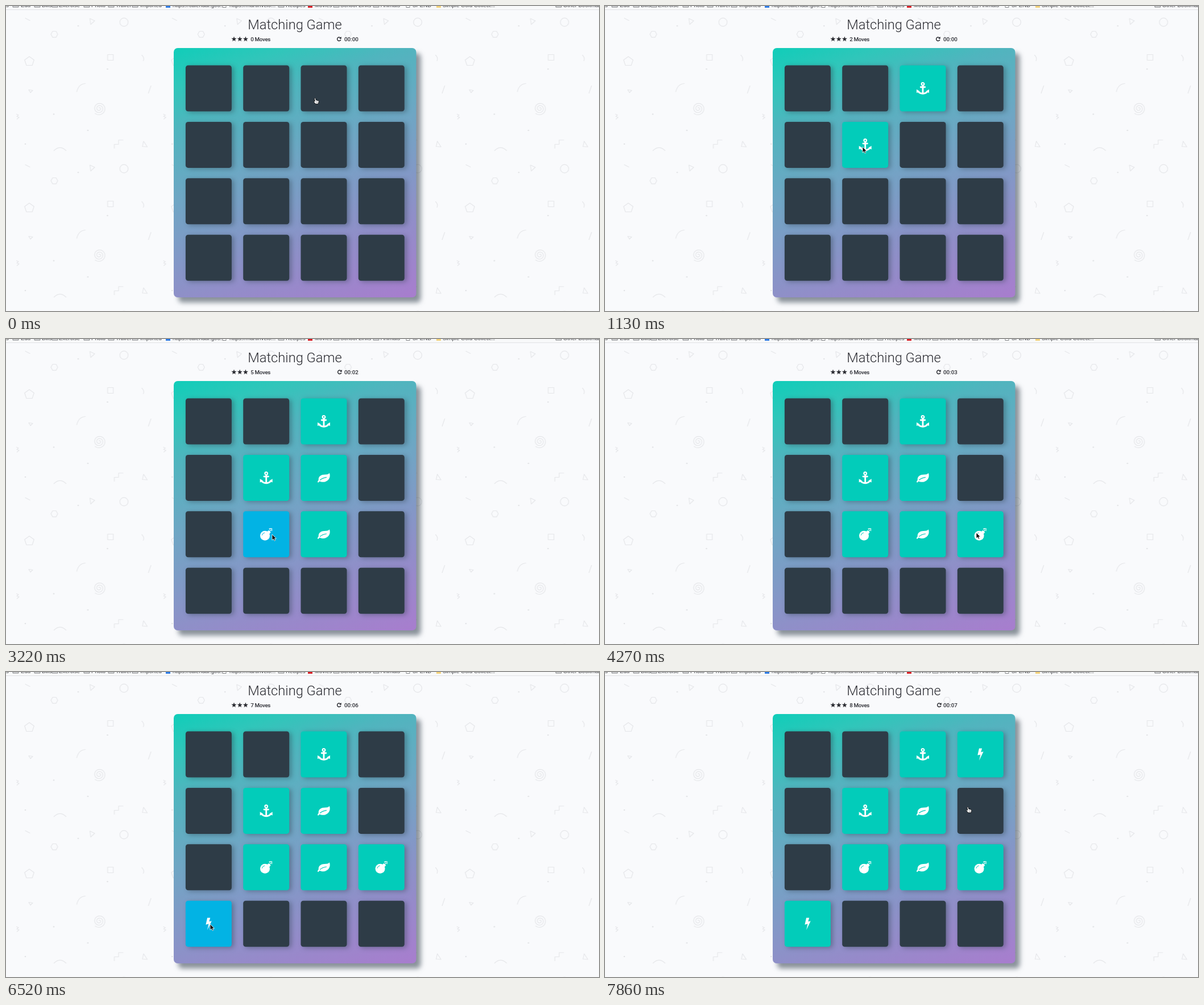
An HTML page for the animation above (8000 ms loop, 1043x537 px).

```html
<!DOCTYPE html>
<html lang="en">
<head>
<meta charset="utf-8">
<title>Matching Game</title>
<style>
  html, body { margin: 0; width: 100%; height: 100%; overflow: hidden; background: #f9fafc; }
  svg { display: block; width: 100%; height: 100%; }
  .title { font: 300 23.7px Roboto, "Liberation Sans", sans-serif; fill: #2b2c32; }
  .stat { font: 500 9.8px Roboto, sans-serif; fill: #2b2c32; }
  .bar { font: 9.6px "Liberation Sans", Arial, sans-serif; fill: #3d3e42; }
  .board { filter: drop-shadow(8px 9px 4px rgba(46, 61, 73, .55)); }
  .card { filter: drop-shadow(4px 2px 4px rgba(46, 61, 73, .42)); }
  .line { fill: none; stroke-linecap: round; stroke-linejoin: round; }
  .cut { fill: none; stroke: currentColor; stroke-linecap: round; }
</style>
</head>
<body>
<svg id="stage" viewBox="0 0 1043 537" xmlns="http://www.w3.org/2000/svg">
  <defs>
    <linearGradient id="sea" gradientUnits="userSpaceOnUse" x1="412.6" y1="31.3" x2="603.4" y2="555.7">
      <stop offset="0" stop-color="#10cdb9"/>
      <stop offset=".12" stop-color="#30c6ba"/>
      <stop offset=".24" stop-color="#4fb5be"/>
      <stop offset=".455" stop-color="#6fa6c4"/>
      <stop offset=".735" stop-color="#8e90c8"/>
      <stop offset="1" stop-color="#a87dce"/>
    </linearGradient>
    <pattern id="doodles" width="258.3" height="258" patternUnits="userSpaceOnUse">
      <g class="line" stroke="#e5e6e9" stroke-width="1.2">
        <path d="M41 89l8.3 6-3.2 9.5h-10.2l-3.2-9.5z"/>
        <path d="M82 44.500h6l3 5.300-3 5.300h-6l-3-5.300z"/>
        <circle cx="207.500" cy="28.500" r="7.300"/>
        <path d="M178.800 85.500h10v10h-10z"/>
        <path d="M147.500 22l8.500 4-7 6.500z"/>
        <path d="M40 147.500l7 1-4 4z"/>
        <path d="M239 86.500q5 4.500 2.500 10"/>
        <path d="M124.500 151q3-13.500 15-14.500"/>
        <path d="M255 140.500l-4.500 13"/>
        <path d="M34 21.500l8 4"/>
        <path d="M18.500 190.500l3.500 1.500-3 2.500 4 1.500-3.500 3"/>
        <path d="M190.500 250.500v-7h7.500v-7.500h8"/>
        <path d="M242 238l6.500 10-8.500-.5z"/>
        <path d="M84.500 254.500q10.500-10.500 21 0"/>
        <path id="swirl"/>
      </g>
      <g fill="#e1e2e5">
        <circle cx="178.500" cy="111" r="1.300"/><circle cx="84" cy="190.500" r="1.300"/>
        <circle cx="144" cy="219" r="1.300"/><circle cx="34" cy="243" r="1.300"/>
        <circle cx="127" cy="35" r="1.200"/>
      </g>
    </pattern>
    <g id="anchor">
      <g class="line" stroke="#fff" stroke-width="2.900">
        <circle cy="-7.700" r="2.300" stroke-width="2.200"/>
        <path d="M0-4.500V9M-3.700-2.300H3.700M-8.500 5Q-6 9 0 9.300Q6 9 8.500 5"/>
      </g>
      <path fill="#fff" d="M-11 8V1.800L-5.200 5.500ZM11 8V1.800L5.200 5.500Z"/>
    </g>
    <g id="leaf">
      <path fill="#fff" d="M9.800-8.500C7.500-5.500 3-6-1-5.500C-6.500-5-10-1-9.200 4C-10.500 5.500-11.300 6.300-10.800 7.600C-10 9-8.600 7.200-7.400 6C-4 8 1.500 8.200 6 5C10.500 1.800 11.800-4 9.800-8.500Z"/>
      <path class="cut" stroke-width="1.200" d="M-6.500 3.800C-3.500 1 0 0 4.500-.8"/>
    </g>
    <g id="bomb">
      <circle cx="-2.200" cy="2.500" r="8.500" fill="#fff"/>
      <path fill="#fff" d="M1.500-4.500L4.200-7L8-3.200L5.300-.5Z"/>
      <path class="line" stroke="#fff" stroke-width="1.100" d="M5.500-4.800L8-7.300M5.200-9.200H7.200M9.800-9.800V-6M6.300-10H10"/>
      <path class="cut" stroke-width="1" d="M-7.400 1.500Q-6.500-2-3-2.800"/>
    </g>
    <path id="bolt" fill="#fff" d="M-2.300-10.500H2.800L.9-3.900L5.300-4.800L-2.300 11L.1.4L-5 1.600Z"/>
    <path id="star" fill="#2b2c32"/>
  </defs>

  <rect width="1043" height="537" fill="#f9fafc"/>
  <rect width="1043" height="537" fill="url(#doodles)"/>
  <rect width="1043" height="6.500" fill="#f8f9fa"/>
  <path d="M0 6.500H1043" stroke="#e2e3e5"/>
  <g id="bar" class="bar"></g>

  <text class="title" x="508" y="41" text-anchor="middle">Matching Game</text>
  <use href="#star" x="401" y="58.300"/><use href="#star" x="411.200" y="58.300"/><use href="#star" x="421.400" y="58.300"/>
  <text id="moves" class="stat" x="430.300" y="61.700" letter-spacing="-.35"></text>
  <g id="reset">
    <path class="line" stroke="#2b2c32" stroke-width="1.500" d="M2.500-2A3.200 3.200 0 1 0 2.800 1.600"/>
    <path fill="#2b2c32" d="M4-4.200V-.4H.2Z"/>
  </g>
  <text id="clock" class="stat" x="619.800" y="61.700" text-anchor="end"></text>

  <rect class="board" x="295" y="74" width="426.500" height="439" rx="7" fill="url(#sea)"/>
  <g id="cards"></g>
  <g id="arrow"><path d="M0 0V10.200L2.400 8L4 11.300L5.800 10.400L4.300 7.300H7.400Z" fill="#0b0b0b" stroke="#fff" stroke-width=".8"/></g>
  <g id="hand"><path d="M-1.200.8Q0-.7 1.100.8L1.700 3.700L6 4.700Q7 5.200 6.700 7L5.700 10.300H.8L-1.700 7.300Q-3 5.500-1.700 5.200L-.2 6Z" fill="#fff" stroke="#15181b" stroke-width="1"/><path d="M2.500 6.200V8M4.300 6.500V8.200" stroke="#15181b" stroke-width=".6"/></g>
</svg>
<script>
const LOOP = 8000, STEP = 150, OFFSET = 60;
const CLOSED = "#2e3c47", OPEN = "#02b3e4", MATCHED = "#02ccba";
const $ = id => document.getElementById(id);

function add(parent, tag, attrs, text) {
  const el = document.createElementNS("http://www.w3.org/2000/svg", tag);
  for (const k in attrs) el.setAttribute(k, attrs[k]);
  if (text) el.textContent = text;
  return parent.appendChild(el);
}

// Bookmark strip: icon kind, icon x, label x, label
const bookmarks = [
  ["", 0, 0, "s"], ["folder", 12, 26, "Edu"], ["folder", 50, 63, "Bills"],
  ["folder", 81, 93, "Exercise"], ["folder", 137, 150, "Photo"], ["folder", 180, 193, "Travel"],
  ["folder", 222, 236, "Imported"], ["#2d7be5", 281, 293, "https://calendar.goo..."],
  ["page", 381, 393, "https://martinvelo..."], ["folder", 479, 492, "Recipes"],
  ["#d81f26", 531, 543, "Movies"], ["folder", 576, 588, "School Links"],
  ["folder", 646, 659, "Animals"], ["page", 704, 715, "SPEND"],
  ["#f3d27a", 757, 768, "Simple Gold Collect..."], ["folder", 967, 980, "Other Bookmarks"]
];
for (const [kind, ix, x, label] of bookmarks) {
  if (kind === "folder") add($("bar"), "path", { d: `M${ix} -4h10v6h-10z`, fill: "#d9dadc", stroke: "#77797c", "stroke-width": .9 });
  else if (kind === "page") add($("bar"), "path", { d: `M${ix} -5h6v7.500h-6z`, fill: "#fff", stroke: "#77797c", "stroke-width": .9 });
  else if (kind) add($("bar"), "rect", { x: ix, y: -5, width: 8, height: 8, fill: kind });
  add($("bar"), "text", { x, y: 1.8 }, label);
}

function polar(count, radius, angle, cx = 0, cy = 0) {
  return "M" + Array.from({ length: count }, (_, i) =>
    `${(cx + radius(i) * Math.cos(angle(i))).toFixed(2)} ${(cy + radius(i) * Math.sin(angle(i))).toFixed(2)}`).join("L");
}
$("star").setAttribute("d", polar(10, i => i % 2 ? 2 : 4.8, i => i * Math.PI / 5 - Math.PI / 2) + "Z");
$("swirl").setAttribute("d", polar(52, i => 1.2 + i * .2, i => i * .33 - 2, 164, 180.5));

// Cards turned over: column, row, icon, time opened, time matched, width at the pop
const turns = [
  [2, 0, "anchor", 290, 1130, 1.2], [1, 1, "anchor", 1130, 1130, 1],
  [2, 1, "leaf", 1730, 2470, 1], [2, 2, "leaf", 2470, 2470, 1],
  [1, 2, "bomb", 3070, 4270, 1.2], [3, 2, "bomb", 4270, 4270, 1],
  [0, 3, "bolt", 6370, 7570, 1.2], [3, 0, "bolt", 7570, 7570, 1]
];
const ticks = [1280, 2320, 3370, 4420, 5320, 6370, 7270];
const resetShift = [0, .6, 1, 1, .6, .6, 0, 2];

const cards = [];
for (let row = 0; row < 4; row++) for (let col = 0; col < 4; col++) {
  const x = 356.4 + col * 101.3, y = 145 + row * 99.4;
  const g = add($("cards"), "g", { class: "card" });
  const face = add(g, "rect", { x: -40.5, y: -40.5, width: 81, height: 81, rx: 4.5 });
  const turn = turns.find(t => t[0] === col && t[1] === row);
  const icon = turn && add(g, "use", { href: "#" + turn[2] });
  cards.push({ x, y, g, face, turn, icon });
}

// Pointer path: time, x, y, 1 for the hand
const path = [
  [0, 543.5, 162, 1], [360, 543.5, 162, 0], [810, 453, 248, 1], [1110, 453, 248, 0],
  [1260, 453, 248, 0], [1410, 545, 250, 0], [1710, 545, 250, 0], [2010, 550, 355, 0],
  [2910, 550, 355, 0], [3060, 468, 344, 0], [3360, 468, 344, 0], [3960, 653, 341, 0],
  [5160, 653, 341, 0], [5610, 360, 471, 1], [5760, 360, 471, 1], [6060, 359, 444, 1],
  [6360, 359, 444, 0], [7110, 359, 444, 0], [7410, 652, 150, 1], [7560, 652, 150, 0],
  [7860, 638, 237.5, 1]
];

function pointer(t) {
  let i = 0;
  while (i < path.length - 1 && path[i + 1][0] <= t) i++;
  const a = path[i], b = path[i + 1] || a;
  const u = b === a ? 0 : (t - a[0]) / (b[0] - a[0]);
  const e = u * u * (3 - 2 * u);
  return { x: a[1] + (b[1] - a[1]) * e, y: a[2] + (b[2] - a[2]) * e, hand: a[3] };
}

function drawCard({ x, y, g, face, turn, icon }, t) {
  let fill = CLOSED, sx = 1;
  if (turn) {
    const [, , , opened, matched, pop] = turn;
    if (t >= opened) fill = t >= matched ? MATCHED : OPEN;
    if (t >= opened && t < opened + STEP) sx = pop;
    icon.setAttribute("visibility", t >= opened ? "visible" : "hidden");
    g.setAttribute("color", fill);
  }
  face.setAttribute("fill", fill);
  g.setAttribute("transform", `translate(${x} ${y}) scale(${sx} 1)`);
}

function draw(t) {
  const passed = times => times.filter(at => t >= at).length;
  const seconds = passed(ticks);
  $("moves").textContent = passed(turns.map(turn => turn[3])) + " Moves";
  $("clock").textContent = "00:0" + seconds;
  $("reset").setAttribute("transform", `translate(${585.8 + resetShift[seconds]} 58.200)`);
  cards.forEach(card => drawCard(card, t));

  // The pointer is refreshed in steps
  const held = Math.max(0, Math.floor((t - OFFSET) / STEP) * STEP + OFFSET);
  const p = pointer(held);
  for (const id of ["arrow", "hand"]) {
    $(id).setAttribute("transform", `translate(${p.x} ${p.y})`);
    $(id).setAttribute("visibility", (id === "hand") === !!p.hand ? "visible" : "hidden");
  }
}

const start = performance.now();
function frame() {
  draw((performance.now() - start) % LOOP);
  requestAnimationFrame(frame);
}
frame();
</script>
</body>
</html>
```
